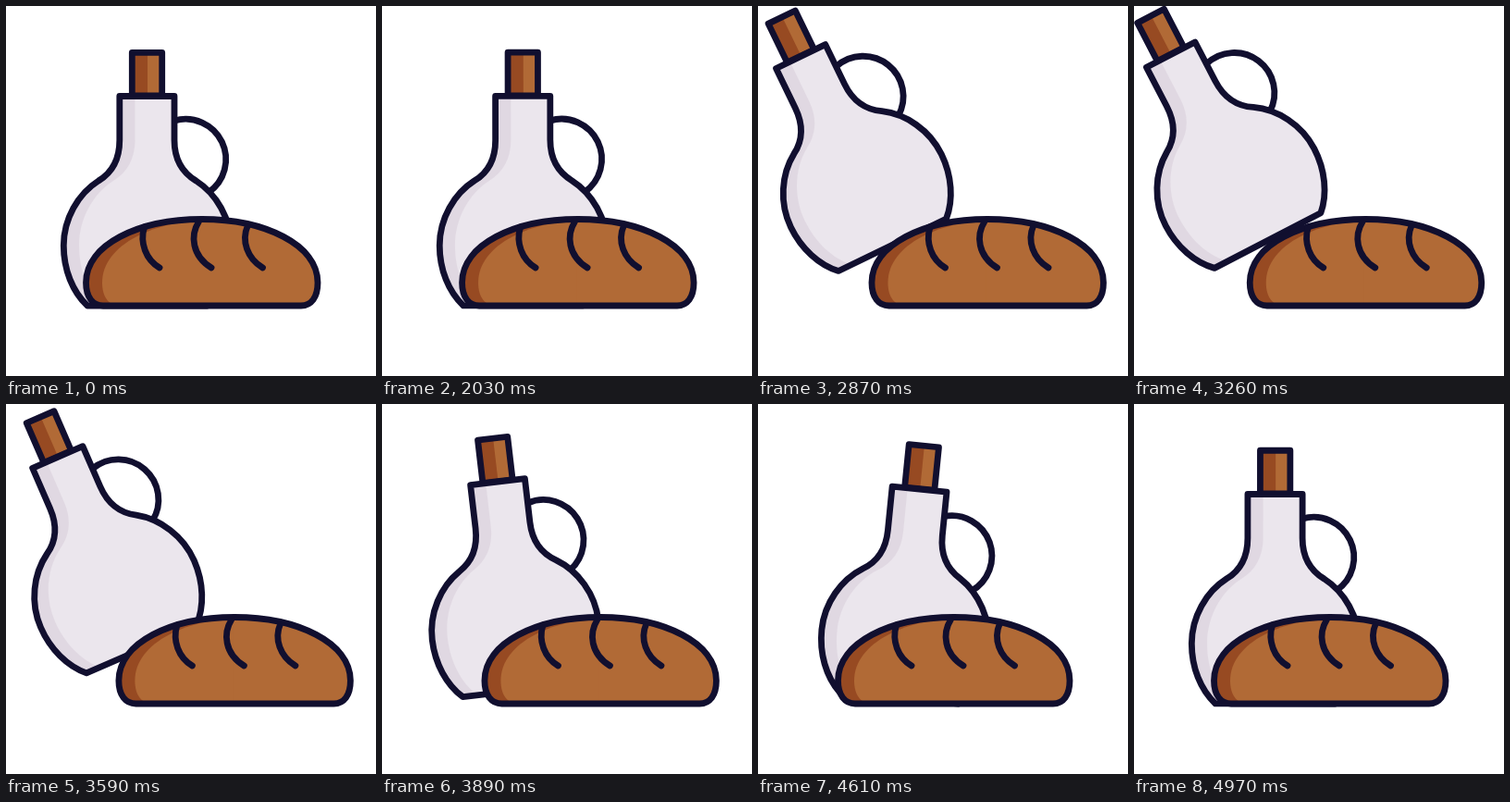
An HTML page for the animation above (5 s loop, 400x400 px).

```html
<!DOCTYPE html>
<html lang="en">
<head>
<meta charset="utf-8">
<title>Bottle and bread</title>
<style>
  html, body { margin: 0; width: 100%; height: 100%; overflow: hidden; background: #fff; }
  svg { display: block; width: 100vw; height: 100vh; }
  .line { fill: none; stroke: #110f2f; stroke-width: 6.8; stroke-linecap: round; stroke-linejoin: round; }
</style>
</head>
<body>
<svg viewBox="0 0 400 400">
  <defs>
    <path id="glass" d="M122.8 97.5V145C122.8 165 115 180 100 189C78 203 62.3 230 62.3 259
      C62.3 285 72 309 88 324H217.5C233.5 309 243.2 285 243.2 259C243.2 230 227.5 203 205.5 189
      C190.5 180 182 165 182 145V97.5Z"/>
    <path id="loaf" d="M105 324H319C330 324 337 315 337 299C337 258 280 230.5 211.7 230.5
      C143 230.5 86.5 258 86.5 299C86.5 315 94 324 105 324Z"/>
    <clipPath id="glassClip"><use href="#glass"/></clipPath>
    <clipPath id="loafClip"><use href="#loaf"/></clipPath>
  </defs>

  <g id="bottle">
    <path class="line" d="M182 124A43.5 43.5 0 0 1 219 201.5"/>
    <path fill="#b16a36" d="M136.3 50.3H168.7V97H136.3Z"/>
    <path fill="#974a22" d="M136.3 50.3H153V97H136.3Z"/>
    <path class="line" d="M136.3 50.3H168.7V97H136.3Z"/>
    <g clip-path="url(#glassClip)">
      <use href="#glass" fill="#e0d8e2"/>
      <path fill="#ebe6ed" d="M139.5 97V145C139.5 165 131 180 116 189C94 203 79 230 79 259
        C79 285 88 309 104 324H260V97Z"/>
    </g>
    <use href="#glass" class="line"/>
  </g>

  <g id="bread">
    <g clip-path="url(#loafClip)">
      <use href="#loaf" fill="#974a22"/>
      <use href="#loaf" x="17.5" fill="#b16a36"/>
      <path fill="#b16a36" d="M210 225H345V330H210Z"/>
    </g>
    <use href="#loaf" class="line"/>
    <path class="line" d="M149.5 239C144.5 256 151 274 166 283M208.5 233C199 248 201 270 222 283
      M261.5 237C254 254 261 273 277.5 283"/>
  </g>
</svg>
<script>
const LOOP = 5000, START = 2000, PEAK = 3200, STEP = 30;
const bottle = document.getElementById('bottle');
const bread = document.getElementById('bread');

// Cubic easing with handles (x1, 0) and (x2, 1), solved by bisection.
function ease(u, x1, x2) {
  if (u <= 0) return 0;
  if (u >= 1) return 1;
  let lo = 0, hi = 1;
  for (let i = 0; i < 24; i++) {
    const s = (lo + hi) / 2, r = 1 - s;
    if (3 * r * r * s * x1 + 3 * r * s * s * x2 + s ** 3 < u) lo = s; else hi = s;
  }
  return lo * lo * (3 - 2 * lo);
}

const push = ms => ease(ms / (PEAK - START), 0.35, 0.275);

function tilt(t) {
  const lean = -27.5, sway = 5.7, turn = 4600;
  if (t < PEAK) return lean * push(t - START);
  if (t < turn) return lean + (sway - lean) * ease((t - PEAK) / (turn - PEAK), 0.6, 0.26);
  return sway * (1 - ease((t - turn) / (LOOP - turn), 0.6, 0.4));
}

// Leaning back lifts the bottle; swaying forward rocks it on its right corner.
function lift(a) {
  return a < 0 ? -a + 0.0175 * a * a : 129.5 * Math.sin(a * Math.PI / 180);
}

function draw(time) {
  const t = START + Math.max(0, Math.floor((time - START) / STEP)) * STEP;
  const a = tilt(t);
  const drift = Math.min(0, Math.max(-1, a / 10));
  // The bread slides out and comes back the same way.
  const slide = 38.8 * push(PEAK - START - Math.abs(t - PEAK));
  bottle.setAttribute('transform', `translate(${drift} ${-lift(a)}) rotate(${a} 88 324)`);
  bread.setAttribute('transform', `translate(${slide} 0)`);
}

const begin = performance.now();
function tick() {
  draw((performance.now() - begin) % LOOP);
  requestAnimationFrame(tick);
}
tick();
</script>
</body>
</html>
```
